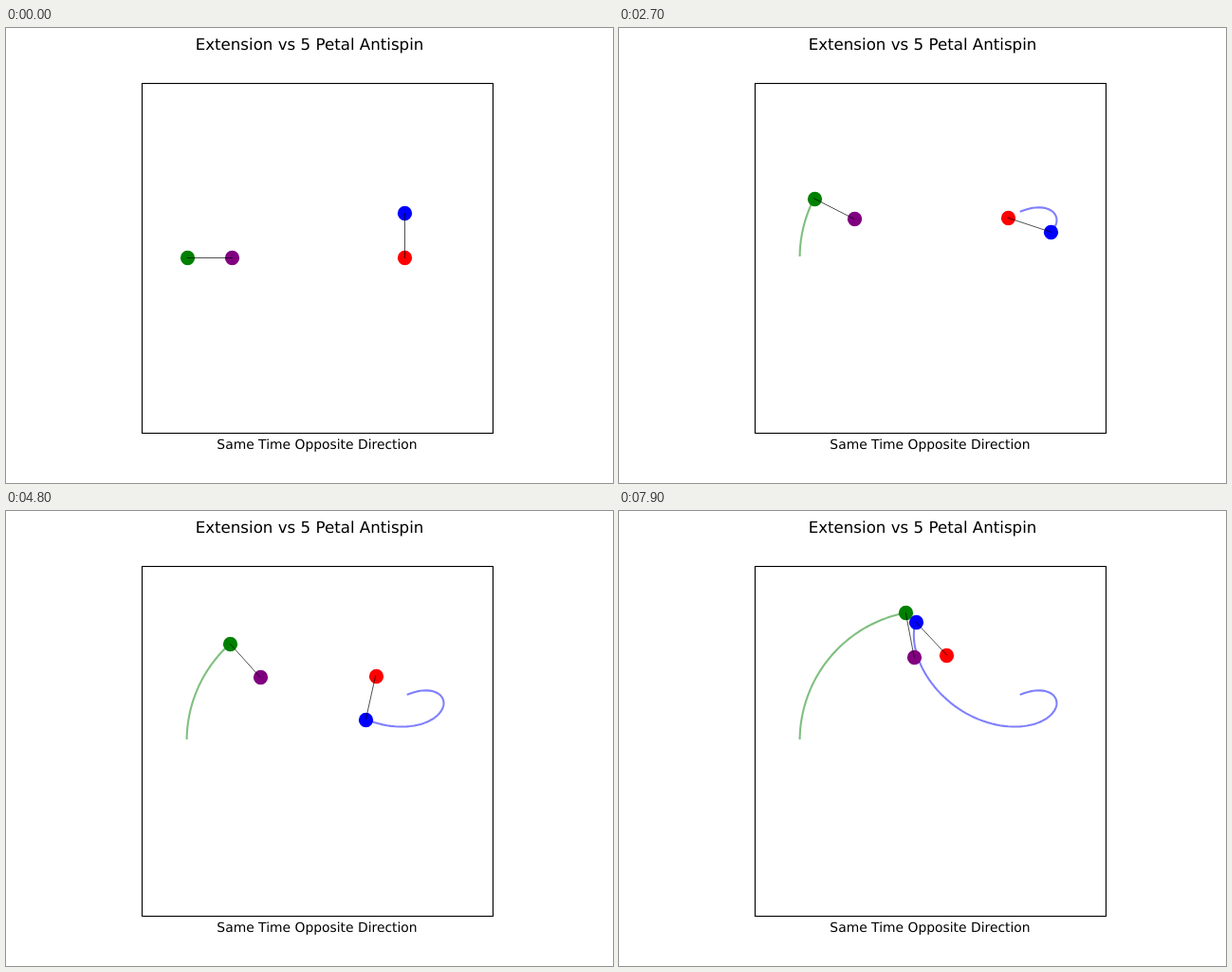
These frames come from a looping animation (640x480 px, 8 s). An HTML page:

```html
<!DOCTYPE html>
<html lang="en">
<head>
<meta charset="utf-8">
<title>Extension vs 5 Petal Antispin</title>
<style>
  html, body { margin: 0; width: 100%; height: 100%; overflow: hidden; background: #fff; }
  svg { display: block; width: 640px; height: 480px; }
  text { font-family: "DejaVu Sans", sans-serif; text-anchor: middle; text-rendering: geometricPrecision; }
  .box { fill: none; stroke: #000; stroke-width: 1.11; }
  .trail { fill: none; stroke-width: 2.08; stroke-linecap: square; stroke-linejoin: round; opacity: .5; }
  .stick { stroke: #000; stroke-width: .69; stroke-linecap: square; }
</style>
</head>
<body>
<svg viewBox="0 0 640 480">
  <text x="320" y="23" font-size="16.667">Extension vs 5 Petal Antispin</text>
  <rect class="box" x="143.5" y="58.5" width="370" height="369"/>
  <text x="328" y="444" font-size="13.889">Same Time Opposite Direction</text>
  <g id="trails"></g>
  <g id="dots"></g>
  <g id="sticks"></g>
</svg>
<script>
const STEP_MS = 100, STEPS = 80, STEP = 2 * Math.PI / 359;
const CENTER = { x: 328, y: 242.4 }, PROP = 47.4;

const polar = (from, r, a) => ({ x: from.x + r * Math.cos(a), y: from.y - r * Math.sin(a) });

function add(parent, tag, attrs) {
  const el = document.createElementNS('http://www.w3.org/2000/svg', tag);
  set(el, attrs);
  return document.getElementById(parent).appendChild(el);
}

function set(el, attrs) {
  for (const key in attrs) el.setAttribute(key, attrs[key]);
}

const dot = fill => add('dots', 'circle', { r: 7.64, fill });

// handAngle and propAngle give directions for a turn of t radians
function makeArm(radius, handColor, headColor, handAngle, propAngle) {
  const trail = add('trails', 'polyline', { class: 'trail', stroke: headColor });
  const stick = add('sticks', 'line', { class: 'stick' });
  const handDot = dot(handColor), headDot = dot(headColor);
  const path = Array.from({ length: STEPS }, (_, n) => {
    const hand = polar(CENTER, radius, handAngle(n * STEP));
    return { hand, head: polar(hand, PROP, propAngle(n * STEP)) };
  });

  const snap = v => Math.floor(v + .5) + .5;
  const place = (el, p) => set(el, { cx: snap(p.x), cy: snap(p.y) });

  return n => {
    const { hand, head } = path[n];
    const fit = n ? v => v : snap; // axis-aligned sticks sit on whole pixels
    place(handDot, hand);
    place(headDot, head);
    set(stick, { x1: fit(hand.x), y1: fit(hand.y), x2: fit(head.x), y2: fit(head.y) });
    set(trail, { points: path.slice(1, n + 1).map(p => `${p.head.x},${p.head.y}`).join(' ') });
  };
}

const mirror = t => Math.PI - t;
const arms = [
  makeArm(92.4, 'red', 'blue', t => t, t => Math.PI / 2 - 4 * t),
  makeArm(90, 'purple', 'green', mirror, mirror)
];

let shown = -1;
const start = performance.now();

function draw() {
  const n = Math.floor((performance.now() - start) / STEP_MS) % STEPS;
  if (n !== shown) {
    arms.forEach(show => show(n));
    shown = n;
  }
  requestAnimationFrame(draw);
}
draw();
</script>
</body>
</html>
```
